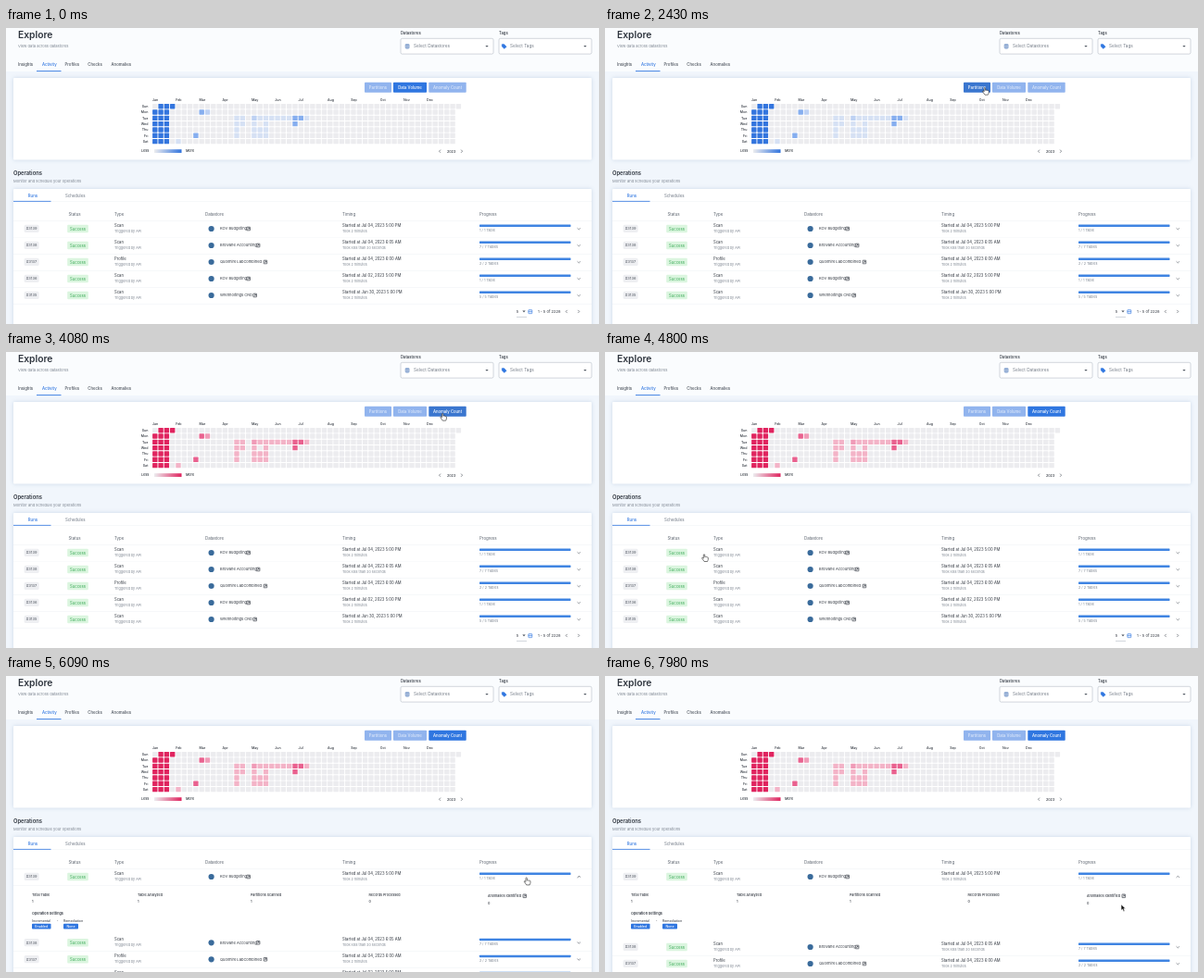
An HTML page for the animation above (8 s loop, 640x320 px).

```html
<!DOCTYPE html>
<html lang="en">
<head>
<meta charset="utf-8">
<title>Explore</title>
<style>
  html, body { margin: 0; width: 100%; height: 100%; overflow: hidden; background: #f1f6fc; }
  svg { display: block; width: 100vw; height: 100vh; font-family: Inter, Roboto, sans-serif; }
  .card { fill: #fff; filter: drop-shadow(0 .6px 2px rgba(70, 110, 160, .22)); }
</style>
</head>
<body>
<svg id="stage" viewBox="0 0 640 320"></svg>
<script>
const LOOP = 8000, SHIFT = 58;
const INK = '#2f353e', GREY = '#7f8792', BLUE = '#2f76e0';
const stage = document.getElementById('stage');

const text = (x, y, str, size = 4.2, fill = INK, weight = 400, anchor = 'start') =>
  `<text x="${x}" y="${y}" font-size="${size}" fill="${fill}" font-weight="${weight}" text-anchor="${anchor}">${str}</text>`;
const rect = (x, y, w, h, fill, r = 0, extra = '') =>
  `<rect x="${x}" y="${y}" width="${w}" height="${h}" rx="${r}" fill="${fill}" ${extra}/>`;
const path = (d, stroke = INK, width = .7, fill = 'none') =>
  `<path d="${d}" fill="${fill}" stroke="${stroke}" stroke-width="${width}" stroke-linejoin="round"/>`;
const hline = (x, y, w, color = '#edf0f4') => rect(x, y, w, .5, color);
const caret = (x, y, fill = '#555c66') => path(`M${x - 1.7} ${y - .8}h3.4l-1.7 1.8z`, 'none', 0, fill);
const side = (x, y, dir) => path(`M${x - dir * .7} ${y - 1.6}l${dir * 1.5} 1.6l${-dir * 1.5} 1.6`, '#3d444e', .6);
const openIcon = (x, y) => rect(x + .3, y - 1.8, 3.6, 3.6, '#fff', .3, `stroke="${INK}" stroke-width=".65"`) +
  path(`M${x + 1.2} ${y + .9}l1.7 -1.8m-1.3 0h1.4v1.4`, INK, .6);

// ---- header -------------------------------------------------------
function select(x, label, prompt, icon) {
  return text(x, 7.2, label, 4.2, INK, 500) +
    rect(x, 11.3, 100, 16.8, '#fff', 1.6, 'stroke="#a5adb8" stroke-width=".5"') +
    icon + text(x + (x < 500 ? 14 : 12), 21.4, prompt, 4.7, '#737b86') + caret(x + 93, 19.8);
}
const dbIcon = rect(430.7, 17.2, 4.8, 5.2, '#7d9ccb', 1.3) +
  path('M430.8 19.2h4.6m-4.6 1.8h4.6', '#fff', .45);
const tagIcon = path('M535.2 17.6h2.4l2.6 2.6l-2.3 2.3l-2.7 -2.6z', BLUE, .4, BLUE);

function header() {
  const tabs = [['Insights', 13], ['Activity', 39], ['Profiles', 63.5], ['Checks', 88.3], ['Anomalies', 113.5]];
  return rect(0, 0, 640, 47, '#fafcfe') +
    text(13, 11.3, 'Explore', 10.3, INK, 600) +
    text(13, 20.9, 'View data across datastores', 4.08, GREY) +
    tabs.map(([s, x]) => text(x, 41.2, s, 4.3, s === 'Activity' ? BLUE : '#4c535d', 500)).join('') +
    rect(33, 46.2, 26.5, .9, BLUE) +
    select(426, 'Datastores', 'Select Datastores', dbIcon) +
    select(532, 'Tags', 'Select Tags', tagIcon);
}

// ---- heatmap ------------------------------------------------------
const PITCH = 6.3;
const PALETTE = {
  blue: ['#ececef', '#d6e1f4', '#bdd1f3', '#86aeef', '#3375de'],
  pink: ['#ececef', '#f3b3c7', '#f09bb7', '#e9618f', '#e0245f']
};
// [row, first column, length, level]
const RUNS = [
  [0, 1, 3, 4], [1, 0, 3, 4], [2, 0, 3, 4], [3, 0, 3, 4], [4, 0, 3, 4], [5, 0, 3, 4], [6, 0, 3, 4],
  [1, 8, 1, 3], [1, 9, 1, 2], [5, 7, 1, 3], [6, 4, 1, 1],
  [2, 14, 2, 1], [2, 17, 1, 2], [2, 18, 2, 1], [2, 20, 4, 1], [2, 24, 1, 3], [2, 25, 1, 3], [2, 26, 1, 1],
  [3, 14, 2, 1], [3, 17, 1, 1], [3, 19, 1, 1], [3, 24, 1, 3],
  [4, 14, 1, 1], [4, 17, 3, 1], [5, 14, 1, 1], [5, 17, 3, 1]
];
const levelAt = (row, col) => {
  const run = RUNS.find(([r, c, n]) => r === row && col >= c && col < c + n);
  return run ? run[3] : 0;
};
function heatmap(name) {
  const colors = PALETTE[name];
  let out = '';
  for (let day = 0; day < 365; day++) {
    const col = Math.floor(day / 7), row = day % 7;
    out += rect((158.1 + col * PITCH).toFixed(2), (82 + row * 6.32).toFixed(2), 5.4, 5.4, colors[levelAt(row, col)], .6);
  }
  return `<g id="${name}"><linearGradient id="${name}Scale"><stop stop-color="${colors[0]}"/>` +
    `<stop offset="1" stop-color="${colors[4]}"/></linearGradient>${out}` +
    rect(160, 131.2, 29.5, 3.8, `url(#${name}Scale)`) + '</g>';
}
const BUTTONS = [['Partitions', 387, 29], ['Data Volume', 418, 36], ['Anomaly Count', 456.3, 40.4]];

function activity() {
  const months = 'Jan Feb Mar Apr May Jun Jul Aug Sep Oct Nov Dec'.split(' ');
  const days = 'Sun Mon Tue Wed Thu Fri Sat'.split(' ');
  const column = m => Math.floor((Date.UTC(2023, m) - Date.UTC(2023, 0)) / 864e5 / 7);
  return rect(8, 54, 624, 88.6, '#fff', 1, 'class="card"') +
    BUTTONS.map(([s, x, w], i) => rect(x, 58.8, w, 11, BLUE, .8, `id="btn${i}"`) +
      `<g id="lbl${i}">${text(x + w / 2, 65.9, s, 4.25, '#fff', 500, 'middle')}</g>`).join('') +
    months.map((s, m) => text(158 + column(m) * PITCH, 79, s, 3.6, INK, 500)).join('') +
    days.map((s, r) => text(153.4, 86 + r * 6.32, s, 3.6, INK, 500, 'end')).join('') +
    heatmap('blue') + heatmap('pink') +
    text(146, 134.4, 'Less', 3.7, INK, 500) + text(194, 134.4, 'More', 3.7, INK, 500) +
    side(468.3, 133.2, -1) + text(480.6, 134.5, '2023', 3.7, INK, 500, 'middle') + side(491.8, 133.2, 1);
}

// ---- operations ---------------------------------------------------
const ROWS = [
  ['#3139', 'Scan', 'KOV Budgeting', 259.6, 'Jul 04, 2023 5:00 PM', '2 minutes', '1 / 1 Table'],
  ['#3138', 'Scan', 'Brolvane Accounting', 270, 'Jul 04, 2023 6:05 AM', 'less than 20 seconds', '7 / 7 Tables'],
  ['#3137', 'Profile', 'Quolmire LabCombined', 277.8, 'Jul 04, 2023 6:00 AM', '2 minutes', '2 / 2 Tables'],
  ['#3136', 'Scan', 'KOV Budgeting', 259.6, 'Jul 02, 2023 5:00 PM', '2 minutes', '1 / 1 Table'],
  ['#3135', 'Scan', 'Wrenholtings CRD', 266.6, 'Jun 30, 2023 5:00 PM', '2 minutes', '5 / 5 Tables']
];
function row([id, type, name, iconX, start, took, tables], i) {
  const y = 217 + i * 18;
  return rect(19.6, y - 4.2, 16, 8.2, '#eeeff2', 1.6) + text(27.6, y + 1.4, id, 4, '#4d545e', 400, 'middle') +
    rect(66.2, y - 4.2, 22.6, 8.4, '#dbf5df', 1) + text(77.5, y + 1.5, 'Success', 4.2, '#36a853', 400, 'middle') +
    text(117, y - 2, type) + text(117, y + 3.8, 'Triggered by API', 3.7, GREY) +
    `<circle cx="221.6" cy="${y}" r="3.1" fill="#3a6b9b"/>` +
    text(231, y + 1.4, name, 4.05) + openIcon(iconX, y) +
    text(363, y - 2, 'Started at ' + start) + text(363, y + 3.8, 'Took ' + took, 3.7, GREY) +
    rect(511, y - 4.5, 98.5, 2.4, '#3f84e2', .4) + text(511, y + 2.5, tables, 3.7, GREY) +
    path(`M616.6 ${y - .7}l1.7 1.6l1.7 -1.6`, '#4c535d', .6).replace('<path', `<path id="chev${i}"`) +
    hline(8, y + 9, 624);
}
function details() {
  const stat = (x, s, v, dy = 0) => text(x, 238.3 + dy, s, 3.7, INK, 500) + text(x, 245.2 + dy * 1.7, v, 3.7, INK, 500);
  const flag = (x, w, s, v) => text(x, 265.8, s, 3.6) + rect(x, 267.8, w, 5.8, BLUE, .8) +
    text(x + w / 2, 272, v, 3.6, '#fff', 500, 'middle');
  return '<g id="details">' + stat(28, 'Total Table', 1) + stat(142, 'Table Analyzed', 1) +
    stat(264, 'Partitions Scanned', 1) + stat(391.5, 'Records Processed', 0) +
    stat(520, 'Anomalies Identified', 0, 1) + openIcon(557.7, 237.8) +
    text(28, 258.4, 'Operation Settings', 3.75, INK, 600) +
    flag(28, 20.5, 'Incremental', 'Enabled') + text(54.8, 265.6, '-', 3.6) + flag(62, 16, 'Remediation', 'None') + '</g>';
}
function footer() {
  return text(550.8, 308, '5', 4.1) + caret(559, 306.4) + hline(551, 312, 11, '#a5adb8') +
    rect(563.8, 304.7, 4, 4, '#dfeafc', .5, `stroke="${BLUE}" stroke-width=".6"`) + hline(563.8, 306, 4, BLUE) +
    text(574, 308, '1 - 5 of 2228', 4.1) + side(605, 306.5, -1) + side(618, 306.5, 1);
}
function operations() {
  const heads = [['Status', 67.5], ['Type', 117], ['Datastore', 215], ['Timing', 363], ['Progress', 511]];
  return text(8, 159, 'Operations', 5.8, INK, 600) +
    text(8, 167.2, 'Monitor and schedule your operations', 4.08, GREY) +
    rect(8, 174, 624, 160, '#fff', 1, 'class="card"') +
    text(23.8, 182.5, 'Runs', 4.3, BLUE, 500) + text(64, 182.5, 'Schedules', 4.3, GREY, 500) +
    hline(8, 187.2, 624) + rect(8, 186.9, 40.5, .8, BLUE) +
    heads.map(([s, x]) => text(x, 202.7, s, 4.4, '#59616c')).join('') +
    hline(8, 208, 624) + row(ROWS[0], 0) + details() +
    '<g id="below">' + rect(8, 226.5, 624, 160, '#fff') +
    ROWS.slice(1).map((r, i) => row(r, i + 1)).join('') + footer() + '</g>';
}

// ---- cursor -------------------------------------------------------
const cursors = '<g id="arrow">' +
  path('M0 0v6.3l1.5 -1.3l1.1 2.4l1.2 -.5l-1.1 -2.4h2z', '#fff', .5, '#111') + '</g><g id="hand">' +
  path('M-.7 .6q.7 -1.1 1.4 0v2.5q.7 -.6 1.2 .1q.7 -.5 1.2 .2q.9 -.4 1.2 .5v2q-.3 1 -.8 2.1h-3.4l-2.4 -3.4q-.2 -1 .7 -.8l.9 .8z',
    '#222', .6, '#fff') + '</g>';

// [ms, x, y]
const TRACK = [
  [270, 440, 326], [1050, 402, 120], [1230, 396, 104], [1380, 396, 104], [1500, 390, 65],
  [1650, 399, 64], [2150, 399, 64], [2900, 437, 65], [3330, 441.5, 65.5], [3450, 442, 65.5],
  [3720, 474, 65], [4050, 474, 65], [4650, 104, 218], [4800, 107, 218.5], [4900, 108, 218.5],
  [5550, 552, 211], [5780, 617, 215], [5960, 617, 215], [6540, 123.5, 239], [6900, 34, 241],
  [7150, 36, 241], [7830, 498, 245], [7980, 557, 247], [8000, 558, 247]
];
const slope = (i, k) => (TRACK[i + 1][k] - TRACK[i][k]) / (TRACK[i + 1][0] - TRACK[i][0]);
function tangent(i, k) {
  if (!i || i === TRACK.length - 1) return 0;
  const a = slope(i - 1, k), b = slope(i, k);
  return a * b > 0 ? 2 * a * b / (a + b) : 0;
}
function along(t, k) {
  if (t <= TRACK[0][0]) return TRACK[0][k];
  const i = Math.min(TRACK.findLastIndex(p => p[0] <= t), TRACK.length - 2);
  const span = TRACK[i + 1][0] - TRACK[i][0], u = (t - TRACK[i][0]) / span, v = 1 - u;
  return TRACK[i][k] * (1 + 2 * u) * v * v + TRACK[i + 1][k] * u * u * (3 - 2 * u) +
    span * (tangent(i, k) * u * v * v - tangent(i + 1, k) * u * u * v);
}

stage.innerHTML = rect(0, 0, 640, 320, '#f1f6fc') + header() + activity() + operations() + cursors;
const parts = {};
stage.querySelectorAll('[id]').forEach(el => parts[el.id] = el);
const show = (el, on) => el.setAttribute('display', on ? 'inline' : 'none');

function draw(t) {
  const x = along(t, 1), y = along(t, 2);
  const active = t < 1750 ? 1 : t < 3000 ? 0 : t < 3900 ? 1 : 2;
  const hovered = BUTTONS.findIndex(([, bx, w]) => x >= bx && x <= bx + w && y > 58.8 && y < 69.8);

  BUTTONS.forEach((_, i) => {
    const on = i === active, hover = i === hovered;
    parts['btn' + i].setAttribute('fill', on ? (hover ? '#3a76cf' : BLUE) : (hover ? '#86a7df' : '#91b4ee'));
    parts['lbl' + i].setAttribute('opacity', on ? 1 : .7);
  });
  show(parts.blue, active < 2);
  show(parts.pink, active === 2);

  const u = Math.min(1, Math.max(0, (t - 5860) / 280)), open = u * u * (3 - 2 * u);
  parts.below.setAttribute('transform', `translate(0 ${SHIFT * open})`);
  show(parts.details, open > 0);
  parts.chev0.setAttribute('transform', `rotate(${180 * open} 618.3 217.1)`);

  const overRow = y > 208 && y < (open ? 226 : 298) && x > 8 && x < 632;
  const hand = t > 1530 && (hovered >= 0 || overRow);
  show(parts.hand, hand);
  show(parts.arrow, !hand && t > 270);
  parts[hand ? 'hand' : 'arrow'].setAttribute('transform', `translate(${x} ${y})`);
}

function tick() {
  draw(performance.now() % LOOP);
  requestAnimationFrame(tick);
}
tick();
</script>
</body>
</html>
```
